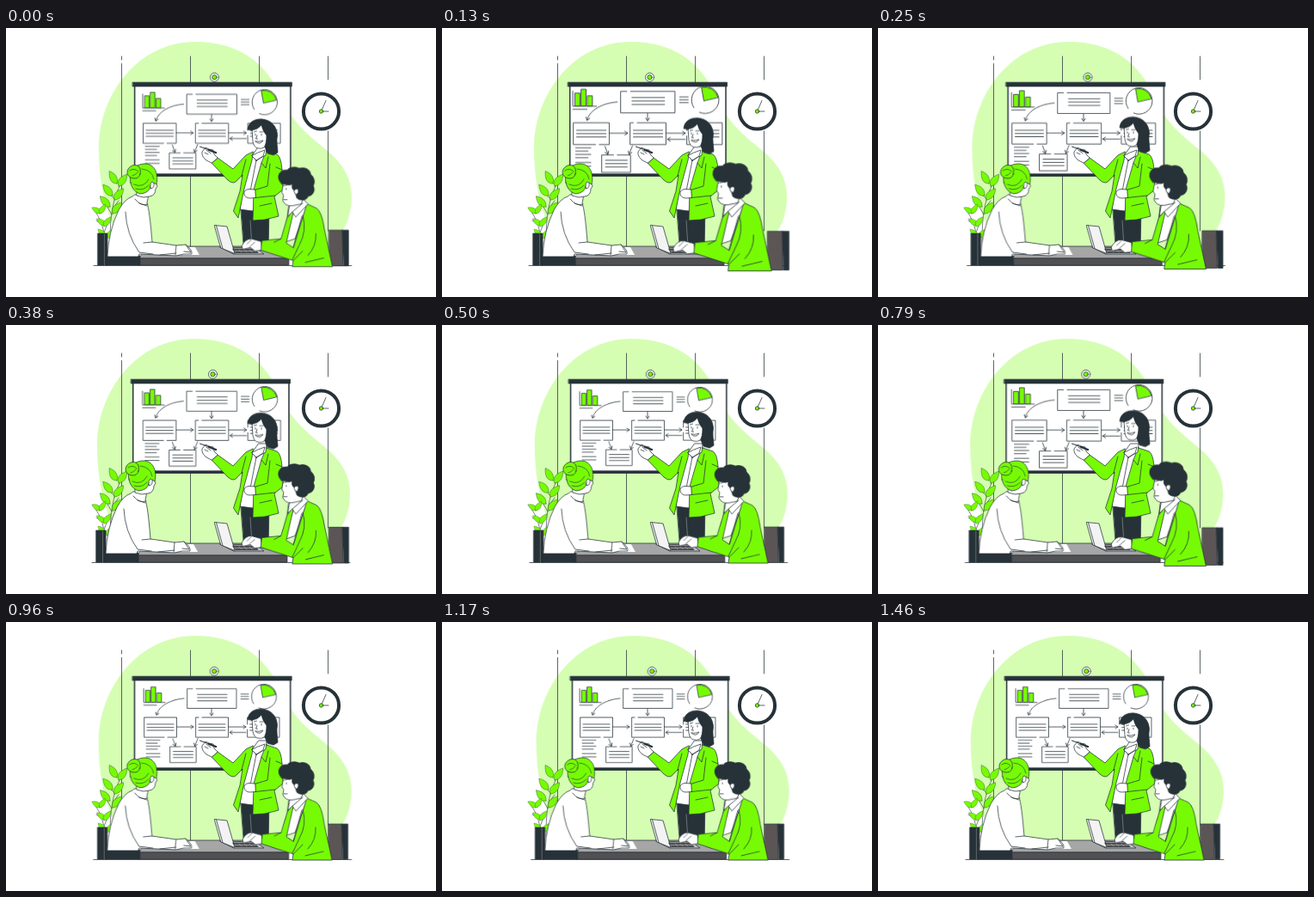
Animation of 500 by 313 pixels, one loop 1500 ms. Source, as an HTML page without scripts:

```html
<!DOCTYPE html>
<html lang="en">
<head>
<meta charset="utf-8">
<title>Team meeting</title>
<style>
  html, body { margin: 0; width: 100%; height: 100%; overflow: hidden; background: #fff; }
  svg { display: block; width: 100vw; height: 100vh; }
  .ink { stroke: #263238; stroke-width: .75; stroke-linecap: round; stroke-linejoin: round; }
  .line { fill: none; }
  .white { fill: #fff; }
  .green { fill: #76fb05; }
  .dark { fill: #263238; }
  .gray { fill: #5b5555; }
  .thin { stroke-width: .6; }
  .shake, .beat, .float { animation: 1.5s linear -20ms infinite; }
  .shake { animation-name: shake; }
  .beat { animation-name: beat; }
  .float { animation-name: float; }
  .chart { transform-origin: 239px 118px; }
  .man { transform-origin: 338px 220px; }
  @keyframes shake {
    0%, 100% { transform: none; }
    10%, 90% { transform: translateX(-1px); }
    20%, 80% { transform: translateX(2px); }
    30%, 50%, 70% { transform: translateX(-4px); }
    40%, 60% { transform: translateX(4px); }
  }
  @keyframes beat {
    0%, 30%, 40%, 60%, 100% { transform: scale(1); }
    10%, 50% { transform: scale(1.1); }
  }
  @keyframes float {
    0%, 100% { transform: translateY(0); }
    50% { transform: translateY(-7px); }
  }
</style>
</head>
<body>
<svg viewBox="0 0 500 313" preserveAspectRatio="none">
  <defs>
    <path id="leaf" d="M0 0C-6-3-6-9-1-17C4-11 5-5 0 0Z"/>
    <path id="head" d="M-3-2L0 0L-3 2"/>
    <path id="notes" d="M0 0H31M0 3.5H31M0 7H31"/>
  </defs>

  <path class="shake" fill="#d5feb3" d="M220 16C270 16 299 40 315 70C331 108 346 120 374 143C393 159 402 176 402 196C402 226 388 252 356 262H146C120 234 108 190 108 140C108 76 155 16 220 16Z"/>

  <!-- wall and clock -->
  <path class="ink line" d="M134.500 33V37M134.500 41.500V250M214.500 33V254M294.500 33V254M374.500 33V60M374.500 120V236"/>
  <g class="ink">
    <circle class="white" cx="366.500" cy="97" r="20.600" stroke-width="4"/>
    <path class="line" d="M366.500 97L372 84.500M366.500 97H375"/>
    <circle class="green" cx="366.500" cy="97" r="2.200"/>
  </g>

  <!-- board -->
  <g class="ink shake">
    <path class="line" d="M102 276.500H402"/>
    <path class="white" stroke-width="1.500" d="M149.700 67H331V171H149.700Z"/>
    <path class="dark" d="M147.500 63.200H332.500V68H147.500ZM149.500 169.800H331V172.500H149.500Z"/>
    <circle class="white" cx="242.500" cy="57.300" r="5"/>
    <circle class="green" cx="242.500" cy="57.300" r="2.700"/>
  </g>

  <g class="beat chart ink">
    <path class="line" d="M160 77.500V93.500H185M160 96.700H175"/>
    <path class="green" d="M162.500 79.500H167.500V93.300H162.500ZM169 75.500H174V93.300H169ZM175.700 82.500H180.700V93.300H175.700Z"/>
    <path class="white" d="M217 77.700H210.500V100.500H268V77.700H221M184 134H160.500V111H198.500V134H188M224 111H220.500V134H258.500V111H228M280.500 119V111H318V134H280.500V125M207 145H221V163.500H190.500V145H203"/>
    <path class="line" d="M222.500 84.300H257M222.500 88H257M222.500 91.700H257M273 83.700H282M273 86.700H282M273 89.700H282M194.500 150.700H217.500M194.500 154.200H217.500M194.500 157.700H217.500M163 137.500H179M163 141H176M163 144.500H179M163 148H176M163 153H179M163 157H179"/>
    <use href="#notes" class="line" x="164" y="119"/>
    <use href="#notes" class="line" x="224" y="119"/>
    <use href="#notes" class="line" x="283.500" y="119"/>
    <path class="white" d="M288 95A14.500 14.500 0 1 1 294 100"/>
    <path class="green" d="M298.500 87.500L296 73.500A14.500 14.500 0 0 1 313.500 84Z"/>
    <path class="line" d="M207 89C192 90 178 97 175 108M239 101V108.500M198.500 122H218M258.500 122H279M279 128.500H260M194 136L197 144M223 135.500L219.500 144"/>
    <g class="line">
      <use href="#head" transform="translate(175 108.500) rotate(108)"/>
      <use href="#head" transform="translate(239 109) rotate(90)"/>
      <use href="#head" transform="translate(218 122)"/>
      <use href="#head" transform="translate(279 122)"/>
      <use href="#head" transform="translate(260 128.500) rotate(180)"/>
      <use href="#head" transform="translate(197 144.500) rotate(70)"/>
      <use href="#head" transform="translate(219.500 144.500) rotate(110)"/>
    </g>
  </g>

  <!-- presenter -->
  <g class="ink">
    <path class="dark" d="M273 208H306L305 260H277Z"/>
    <path class="line thin" stroke="#9aa0a3" d="M284 224L286 254"/>
    <path class="white" d="M286 148L294 141L304 143L300 180L287 213L272 211L277 178Z"/>
    <path class="line" d="M291 154L284 190M287 148L291 155L299 148"/>
    <path class="green" d="M287 144L279 148L264 164L246 151L239 157L258 177Q265 183 269 177L275 171L272 190L264.500 213L270 221L277 187L286 154Z"/>
    <path class="green" d="M303 143L315 147Q320 150 321 165L322 188L312 196L317 219L301 223L287 224L288 188L297 157Z"/>
    <path class="line" d="M279 153L274 172M307 158L304 184L289 188.500M290 197.500L313 195M295 207L309 204M297 157L302 163L305 150M321 165L314 162"/>
    <path class="white" d="M289.500 188L282 187.500Q276 189 277 193Q278 198 284 198L290 197.500Z"/>
    <path class="white" d="M239 157L233 154Q227 149 228 144L232 139L236 141L241 142L242 147L246 151Z"/>
    <path class="line" d="M231 145L235 147M233 142L238 146"/>
    <path class="line" stroke-width="1" d="M225.500 138L235 141.500"/>
    <path class="line" stroke-width="2.400" d="M236 142L244 145"/>
    <path class="white" d="M294 138H303L302 148L291 154L286 149Z"/>
    <g class="float">
      <path class="dark" d="M281 118C282 110 288 106 297 106C309 107 315 115 315.500 125C314 132 316 139 316 145L311 148L304 146L300 136L288 120Z"/>
      <path class="white" d="M286.500 119Q293 118 297 113Q299 121 303 125Q303 135 300 139Q297 141 293 140Q288 139 287 132Z"/>
      <path class="line" d="M288.500 121L291.500 120M295 121L299 121M292 125L290.500 129H292.500M290 132Q295 137 299 131Q294 133 290 132"/>
      <path class="dark" d="M290 123.500V125M297 123.500V125"/>
    </g>
    <path class="white" d="M293 145L301 142L299 149L291 154L286 149Z"/>
  </g>

  <!-- plant -->
  <g class="ink thin">
    <path class="line" d="M121 249C121 222 123 201 134 180M123 217L115 203M124 210L131 201M126 199L118 190M114 243C114 232 109 221 104 214M114 238L119 225M111 228L105 224M115 245L120 240"/>
    <g class="green" stroke-width=".35">
      <use href="#leaf" transform="translate(131 184) rotate(38)"/>
      <use href="#leaf" transform="translate(129 181) rotate(-28)"/>
      <use href="#leaf" transform="translate(124 195) rotate(-38)"/>
      <use href="#leaf" transform="translate(126 200) rotate(42)"/>
      <use href="#leaf" transform="translate(121 208) rotate(-40)"/>
      <use href="#leaf" transform="translate(124 216) rotate(42)"/>
      <use href="#leaf" transform="translate(111 215) rotate(-58) scale(.75)"/>
      <use href="#leaf" transform="translate(109 216) rotate(35) scale(.75)"/>
      <use href="#leaf" transform="translate(116 229) rotate(-53) scale(.75)"/>
      <use href="#leaf" transform="translate(114 231) rotate(38) scale(.8)"/>
      <use href="#leaf" transform="translate(116 243) rotate(-42) scale(.75)"/>
      <use href="#leaf" transform="translate(117 245) rotate(38) scale(.75)"/>
    </g>
  </g>

  <!-- seated woman and table -->
  <g class="ink shake">
    <path class="dark" d="M107 239H118V276H107Z"/>
    <path class="line" stroke="#777" d="M114.500 240V276"/>
    <path fill="#a6a6a6" d="M165 254H302L329 268H155Z"/>
    <path fill="#515153" d="M155 268H329V276H155Z"/>
    <path class="white" stroke="none" d="M185 255H220L225 264H177Z"/>
    <path class="dark" d="M118 265H156V276H117Z"/>
    <path class="white" d="M150 194L166 193L164 204Q167 211 170 249L198 253L209 252Q217 258 216 263L207 263L198 265L155 263L154 266H118Q119 237 131 212Q138 199 147 196Z"/>
    <path class="line" d="M139 214Q140 240 155 261L171 263M150 199Q157 208 165 205M164 207L155 204M170 249L160 250M198 253L197 264M209 252L215 261L207 260M179 264L198 262"/>
    <path class="white" d="M164 170Q173 172 174 180L176 184L174 187Q174 195 167 196L160 197L152 195V180Z"/>
    <path class="green" d="M145 180C142 167 150 158 162 158C172 158 178 168 175 182Q171 178 168 184Q167 192 156 193Q147 190 145 180Z"/>
    <path class="white" d="M168 184Q168 177 172 180Q173 186 169 187Z"/>
    <path class="green" d="M156 170C158 162 153 158 147 160C140 163 139 171 145 174C150 176 155 175 156 170Z"/>
    <path class="line thin" d="M144 166Q149 162 154 167M147 172Q151 171 153 168M158 164Q170 165 172 176M149 182Q160 187 166 176M151 187Q160 190 166 183"/>
  </g>

  <!-- laptop -->
  <g class="ink">
    <path fill="#bfc1c2" d="M249 255L291 256L300 263H265Z"/>
    <path fill="#f3f3f3" d="M242.500 229.500L257 231L266 262.500L250 256Z"/>
    <path class="line" d="M244.500 230L252 256.500"/>
    <path class="gray" d="M264 257L289 257.500L293 261.500H267Z"/>
    <path class="line thin" stroke="#aaa" d="M266 259.500H291M271 258L274 261M277 258L280 261M283 258L286 261"/>
  </g>

  <!-- seated man -->
  <g class="beat man ink">
    <path class="gray" d="M375 235H391V276H375Z"/>
    <path class="dark" d="M390.500 235H397.500V276H392Z"/>
    <path class="white" d="M297 248L286 245Q279 245 275 253L276 257L285 255L290 259L298 258Z"/>
    <path class="line thin" d="M286 246L281 251M290 249L284 254"/>
    <path class="white" d="M329 208L344 200L350 207L336 245L324 249Z"/>
    <path class="green" d="M350 205L361 210Q367 214 370 235L379 277H333L334 270L297 258L298 247L320 245L327 221L335 211L326 250L334 255Z"/>
    <path class="line" d="M345 218Q350 236 341 252L333 269M334 255L344 219M360 239Q361 253 351 264M348 272L369 267M334 270L345 259M320 245L312 249"/>
    <path class="white" d="M330 207L343 197L351 205L337 220L333 214L328 219Z"/>
    <path class="line" d="M333 214L345 204"/>
    <path class="white" d="M324 180Q321 187 321 192L323 195L322 201Q325 208 333 207L343 205L348 194L339 180Z"/>
    <path class="dark" d="M318 178C315 171 320 165 327 166C330 162 337 162 341 164C348 162 354 166 354 171C359 175 359 181 357 184C360 190 356 196 351 196C350 201 342 202 338 198L336 190C333 189 332 185 333 182C328 185 325 181 321 182Z"/>
    <path class="white" d="M335 190Q337 186 340 189Q340 194 337 194Z"/>
    <path class="line" d="M324 184L327 183M326 187V188.500M323 200L327 200"/>
  </g>
</svg>
</body>
</html>
```
